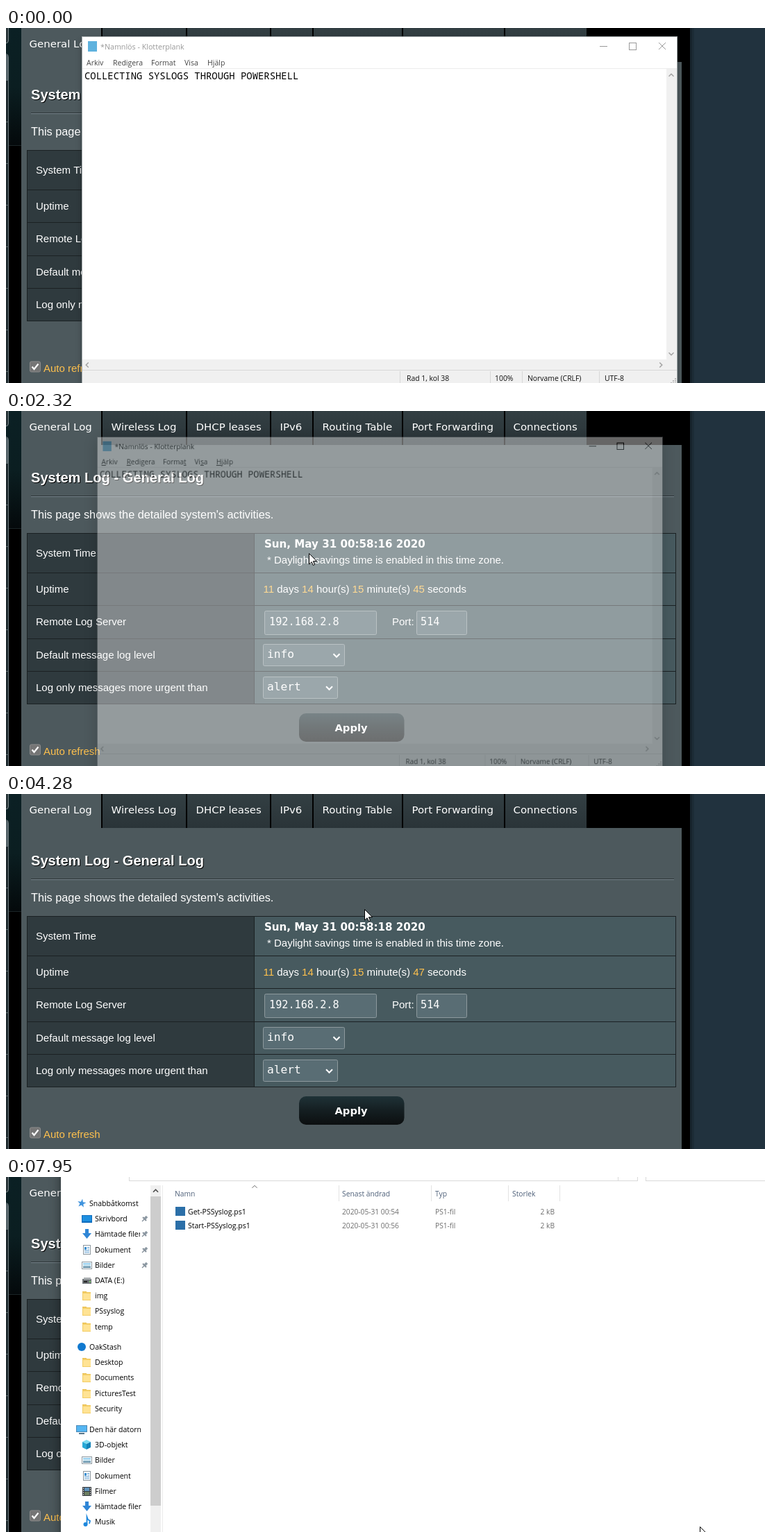
An HTML page with a canvas for the animation above (8000 ms loop, 1093 by 512 pixels).

```html
<!DOCTYPE html>
<html lang="sv">
<head>
<meta charset="utf-8">
<title>Syslog</title>
<style>
html, body { margin: 0; width: 100%; height: 100%; overflow: hidden; background: #000; }
canvas { display: block; }
</style>
</head>
<body>
<canvas id="stage" width="1093" height="512"></canvas>
<script>
const W = 1093, H = 512, LOOP = 8000;
const stage = document.getElementById('stage').getContext('2d');
const layer = Object.assign(document.createElement('canvas'), { width: W, height: H });
let g = stage;

const ui = (px = 10.5) => `${px}px "Open Sans", "Noto Sans", sans-serif`;
const arial = (px = 15, weight = '') => `${weight} ${px}px "Liberation Sans", sans-serif`;
const wide = (px, weight = '') => `${weight} ${px}px "DejaVu Sans", sans-serif`;
const mono = px => `${px}px "DejaVu Sans Mono", monospace`;

function rect(x, y, w, h, color) {
  g.fillStyle = color;
  g.fillRect(x, y, w, h);
}
function round(x, y, w, h, r, fill, edge) {
  g.beginPath();
  g.roundRect(x, y, w, h, r);
  g.fillStyle = fill;
  g.fill();
  if (edge) { g.strokeStyle = edge; g.lineWidth = 1; g.stroke(); }
}
function frame(x, y, w, h, color) {
  g.strokeStyle = color;
  g.lineWidth = 1;
  g.strokeRect(x + .5, y + .5, w - 1, h - 1);
}
function text(s, x, y, font, color = '#fff') {
  g.font = font;
  g.fillStyle = color;
  g.fillText(s, x, y);
  return x + g.measureText(s).width;
}
function line(points, color, width = 1) {
  g.beginPath();
  points.forEach(([x, y]) => g.lineTo(x, y));
  g.strokeStyle = color;
  g.lineWidth = width;
  g.stroke();
}
function shape(points, fill) {
  g.beginPath();
  points.forEach(([x, y]) => g.lineTo(x, y));
  g.closePath();
  g.fillStyle = fill;
  g.fill();
}
function disc(x, y, r, fill) {
  g.beginPath();
  g.arc(x, y, r, 0, 7);
  g.fillStyle = fill;
  g.fill();
}
function fade(y0, y1, ...colors) {
  const f = g.createLinearGradient(0, y0, 0, y1);
  colors.forEach((c, i) => f.addColorStop(i / (colors.length - 1), c));
  return f;
}
// Small open arrowhead pointing along (dx, dy)
function chevron(x, y, dx, dy, size, color, width) {
  const tip = s => [x - dx * size / 2 + dy * s * size, y - dy * size / 2 + dx * s * size];
  line([tip(-1), [x + dx * size / 2, y + dy * size / 2], tip(1)], color, width);
}
function shadow(x, y, w, h, blur, alpha) {
  g.save();
  g.shadowColor = `rgba(0,0,0,${alpha})`;
  g.shadowBlur = blur;
  g.shadowOffsetY = 3;
  rect(x, y, w, h, '#fff');
  g.restore();
}

/* ---------- router page ---------- */
const TABS = [
  ['General Log', 22, 115, 34], ['Wireless Log', 139, 120, 152], ['DHCP leases', 261, 119, 274],
  ['IPv6', 382, 59, 395], ['Routing Table', 443, 127, 456], ['Port Forwarding', 572, 145, 585],
  ['Connections', 719, 117, 731]];
const ROWS = [
  ['System Time', 176, 233], ['Uptime', 233, 280], ['Remote Log Server', 280, 328],
  ['Default message log level', 328, 375], ['Log only messages more urgent than', 375, 422]];
const GOLD = '#ffc14d', FIELD = '#596d74', EDGE = '#8d999d', RULE = '#1b2123';

function sidebar() {
  rect(0, 0, 22, 170, fade(0, 170, '#0b2024', '#0b1e21', '#04090b'));
  rect(4, 169, 18, 1, '#1b2427');
  round(-10, -10, 13.5, 32, 4, '#2a3639', '#79868a');
  round(-10, 37.5, 13.5, 500, 4, '#1f2a2e', '#6d7a7e');
  rect(0, 39, 3, 36, '#566469');
  for (let i = 0; i < 8; i++) rect(0, 75 + i * 60, 4, 1, '#5d6a6e');
}

function page(sec) {
  rect(0, 0, W, H, '#000');
  rect(985, 0, 108, H, '#21323e');
  rect(985, 0, 3, H, '#17242d');
  rect(988, 0, 3, H, '#1c2c36');
  sidebar();
  rect(22, 49, 951, H, '#4d595d');
  TABS.forEach(([label, x, w, tx], i) => {
    round(x, -8, w, 57, [8, 8, 0, 0], i ? fade(0, 49, '#333f43', '#2a3438') : '#4d595d');
    text(label, tx - .5, 28, wide(14.95));
  });

  text('System Log - General Log', 37, 104, arial(20.1, 'bold'), '#000');
  text('System Log - General Log', 36, 103, arial(20.1, 'bold'));
  rect(36, 122, 926, 1, '#2c3437');
  rect(36, 123, 926, 1, '#76838a');
  text("This page shows the detailed system's activities.", 36, 155, arial(16.28));

  for (const [label, top, bottom] of ROWS) {
    rect(30, top, 327, bottom - top, '#2f3a3e');
    rect(357, top, 608, bottom - top, '#475a5f');
    rect(30, top, 935, 1, RULE);
    text(label, 43, Math.round((top + bottom) / 2 + 5.2), arial());
  }
  frame(30, 176, 935, 247, RULE);
  rect(357, 176, 1, 247, RULE);

  text(`Sun, May 31 00:58:${sec} 2020`, 372, 197, wide(15.1, 'bold'));
  text('* Daylight savings time is enabled in this time zone.', 376, 220, arial());
  let x = 370.5;
  [11, ' days ', 14, ' hour(s) ', 15, ' minute(s) ', sec + 29, ' seconds']
    .forEach((s, i) => x = text(s, x, 262, arial(), i % 2 ? '#fff' : GOLD));

  round(372.5, 288.5, 161, 34, 2, FIELD, EDGE);
  text('192.168.2.8', 379, 309, mono(15.2));
  text('Port:', 556, 309, arial());
  round(591.5, 288.5, 72, 34, 2, FIELD, EDGE);
  text('514', 597, 309, mono(15.2));
  round(370.5, 336.5, 117, 31, 2, FIELD, EDGE);
  text('info', 376, 356, mono(16.2));
  chevron(476, 352.5, 0, 1, 4.5, '#fff', 2);
  round(370.5, 383.5, 107, 31, 2, FIELD, EDGE);
  text('alert', 376, 403, mono(16.2));
  chevron(465.5, 399.5, 0, 1, 4.5, '#fff', 2);

  round(422, 436, 151.5, 41, 10, fade(436, 477, '#1f3237', '#141e21', '#0c0f10'));
  text('Apply', 473.5, 462, wide(14.7, 'bold'));
  round(34.5, 481, 15, 15, 2, '#757575', '#8b8b8b');
  line([[37.5, 488.5], [40.5, 492], [46.5, 484.5]], '#fff', 2.2);
  text('Auto refresh', 54, 496, arial(), GOLD);
}

/* ---------- text editor ---------- */
const MENU = [['Arkiv', 116, 0], ['Redigera', 154, 0], ['Format', 209, 5], ['Visa', 257, 2], ['Hjälp', 290, 0]];
const STATUS = [['Rad 1, kol 38', 567, 577], ['100%', 697, 704], ['Norvame (CRLF)', 743, 751], ['UTF-8', 854, 862]];

function editor(active, deep, keys) {
  const ink = active ? '#000' : '#999';
  shadow(109, 13, 857, 520, deep ? 20 : 8, deep ? .45 : .3);
  frame(109, 12, 858, 520, active ? '#6b7275' : '#a5abad');
  round(118, 19, 13, 15, 0, '#5fb2de');
  text('*Namnlös - Klotterplank', 136, 31, ui(10.7), ink);
  rect(855, 26, 11, 1, ink);
  frame(897, 21, 11, 11, ink);
  line([[940, 21], [950, 31]], ink);
  line([[950, 21], [940, 31]], ink);
  for (const [label, x, key] of MENU) {
    text(label, x, 54, ui(), active ? '#111' : '#444');
    if (keys) {
      const left = x + g.measureText(label.slice(0, key)).width;
      rect(left, 55, g.measureText(label[key]).width, 1, '#111');
    }
  }
  rect(110, 58, 856, 1, '#ececec');
  text('COLLECTING SYSLOGS THROUGH POWERSHELL', 113, 74, '13.9px "Noto Sans Mono", monospace', '#000');

  rect(951, 59, 15, 420, '#f0f0f0');
  rect(110, 478, 856, 34, '#f0f0f0');
  rect(110, 493, 856, 1, '#d7d7d7');
  chevron(958, 68, 0, -1, 3.5, '#a3a3a3', 1.5);
  chevron(958, 470, 0, 1, 3.5, '#a3a3a3', 1.5);
  chevron(117, 486, -1, 0, 3.5, '#a3a3a3', 1.5);
  chevron(943, 486, 1, 0, 3.5, '#a3a3a3', 1.5);
  for (const [label, bar, x] of STATUS) {
    rect(bar, 495, 1, 17, '#d7d7d7');
    text(label, x, 509, ui(10.4), '#111');
  }
  for (const [x, y] of [[963, 505], [960, 508], [963, 508], [957, 511], [960, 511], [963, 511]])
    rect(x, y, 2, 2, '#b8b8b8');
}

/* ---------- file browser ---------- */
const ICONS = {
  star(x, y) {
    shape(Array.from({ length: 10 }, (_, i) => {
      const r = i % 2 ? 2.6 : 6.5, a = i * Math.PI / 5 - 1.4;
      return [x + r * Math.cos(a), y + r * Math.sin(a)];
    }), '#3f93dd');
  },
  desk(x, y) {
    rect(x - 7, y - 5, 15, 11, '#0f6cbd');
    rect(x - 6, y - 4, 13, 8, '#1e8fe0');
  },
  down(x, y) {
    shape([[-2, -7], [3, -7], [3, -1], [7, -1], [.5, 7], [-6, -1], [-2, -1]]
      .map(([a, b]) => [x + a, y + b]), '#2f86d6');
  },
  doc(x, y) {
    rect(x - 5, y - 7, 11, 14, '#8a969e');
    rect(x - 4, y - 6, 9, 12, '#fff');
    rect(x - 3, y - 4, 3, 4, '#3c8fd0');
    for (let i = 0; i < 4; i++) rect(x - (i < 2 ? -1 : 3), y - 4 + i * 2.5, i < 2 ? 3 : 7, 1, '#5b9bd0');
  },
  pic(x, y) {
    rect(x - 7, y - 5, 15, 11, '#8f9ba3');
    rect(x - 6, y - 4, 13, 9, '#fff');
    rect(x - 5, y - 3, 11, 7, fade(y - 3, y + 4, '#8ccbf0', '#cfe8f3', '#3d6f8c'));
  },
  disk(x, y) {
    rect(x - 6, y - 2, 13, 7, '#6e7377');
    rect(x - 4, y - 4, 10, 3, '#a9aeb1');
    rect(x - 4, y + 1, 5, 2, '#222');
    rect(x + 4, y + 1, 2, 2, '#7ad06c');
  },
  folder(x, y) {
    rect(x - 6, y - 6, 6, 4, '#e9bd4d');
    rect(x - 6, y - 5, 12, 12, '#f3cd66');
    rect(x - 5, y - 3, 11, 9, '#ffe394');
  },
  dot(x, y) { disc(x, y, 6, '#1079cf'); },
  pc(x, y) {
    rect(x - 8, y - 6, 16, 10, '#4a88b5');
    rect(x - 7, y - 5, 14, 8, '#55b6f2');
    rect(x - 4, y + 5, 8, 2, '#55748a');
  },
  cube(x, y) {
    shape([[x, y - 7], [x + 6, y - 4], [x, y - 1], [x - 6, y - 4]], '#7fdcf0');
    shape([[x - 6, y - 4], [x, y - 1], [x, y + 7], [x - 6, y + 4]], '#27a9d6');
    shape([[x + 6, y - 4], [x, y - 1], [x, y + 7], [x + 6, y + 4]], '#1483b8');
  },
  film(x, y) {
    rect(x - 6, y - 6, 13, 13, '#33383c');
    rect(x - 3, y - 5, 7, 5, '#5f93bd');
    rect(x - 3, y + 1, 7, 5, '#6d7f62');
    for (let i = 0; i < 4; i++) { rect(x - 5, y - 5 + i * 3, 1, 2, '#ddd'); rect(x + 5, y - 5 + i * 3, 1, 2, '#ddd'); }
  },
  note(x, y) {
    disc(x - 1.5, y + 4, 3, '#1e88dd');
    line([[x + .5, y + 4], [x + .5, y - 7], [x + 2, y - 3], [x + 5, y - 1], [x + 4, y + 3]], '#1e88dd', 1.8);
  }
};
// Groups: first row y, heading, then entries; the last word is the icon
const TREE = [
  [38, 'Snabbåtkomst star', 'Skrivbord desk', 'Hämtade filer down', 'Dokument doc', 'Bilder pic',
    'DATA (E:) disk', 'img folder', 'PSsyslog folder', 'temp folder'],
  [245, 'OakStash dot', 'Desktop folder', 'Documents folder', 'PicturesTest folder', 'Security folder'],
  [364, 'Den här datorn pc', '3D-objekt cube', 'Bilder pic', 'Dokument doc', 'Filmer film',
    'Hämtade filer down', 'Musik note']];

function pin(x, y) {
  line([[x - 4, y + 4], [x - 1, y + 1]], '#7f8b95', 1.2);
  line([[x - 3, y - 2], [x + 2, y + 3]], '#7f8b95', 1.8);
  line([[x - 1, y + 1], [x + 3, y - 3]], '#8d99a3', 3.6);
}

function browser() {
  shadow(79, -20, 1040, 560, 16, .45);
  rect(177, 5, 733, 1, '#d9d9d9');
  for (const x of [177, 881, 909, 921]) rect(x, 0, 1, 5, '#d9d9d9');
  rect(921, 5, 172, 1, '#d9d9d9');

  for (const [top, ...items] of TREE) items.forEach((item, i) => {
    const cut = item.lastIndexOf(' '), y = Math.round(top + i * 22.2);
    const pinned = top === 38 && i > 0 && i < 5;
    ICONS[item.slice(cut + 1)](i ? 116 : 109, y);
    g.save();
    g.beginPath();
    g.rect(79, 0, pinned ? 114 : 128, H);
    g.clip();
    text(item.slice(0, cut), i ? 128 : 120, y + 4, ui(), '#000');
    g.restore();
    if (pinned) pin(200, y);
  });

  rect(208, 12, 15, 500, '#f0f0f0');
  rect(208, 28, 15, 446, '#cdcdcd');
  chevron(215.5, 20, 0, -1, 3.5, '#505050', 1.7);
  rect(225, 12, 1, 500, '#ebebeb');

  [['Namn', 243], ['Senast ändrad', 484], ['Typ', 618], ['Storlek', 729]]
    .forEach(([s, x]) => text(s, x, 28, ui(10.3), '#4d5f78'));
  for (const x of [479, 612, 723, 797]) rect(x, 12, 1, 23, '#e3e3e3');
  chevron(358, 14, 0, -1, 3.5, '#666', 1);
  [['Get-PSSyslog.ps1', '54', 50], ['Start-PSSyslog.ps1', '56', 70]].forEach(([name, min, y]) => {
    rect(244, y - 7, 14, 13, '#2b6fa8');
    text(name, 262, y + 4, ui(), '#000');
    text('2020-05-31 00:' + min, 484, y + 4, ui(10.2), '#6d6d6d');
    text('PS1-fil', 618, y + 4, ui(10.2), '#6d6d6d');
    g.textAlign = 'right';
    text('2 kB', 790, y + 4, ui(10.2), '#6d6d6d');
    g.textAlign = 'left';
  });
}

/* ---------- pointer ---------- */
// start, end, number of steps, path (empty: hidden)
const MOVES = [
  [0, 0, 1, []],
  [520, 1070, 8, [[855, 479], [730, 392], [570, 290], [444, 232], [449, 229]]],
  [1220, 1370, 3, [[446, 229], [437, 229]]],
  [2320, 2400, 2, [[436, 205], [435, 180]]],
  [2560, 3340, 11, [[440, 190], [470, 255], [505, 301], [530, 298], [541, 289]]],
  [3410, 3560, 3, [[536, 268], [520, 204]]],
  [3880, 4040, 3, [[519, 192], [516, 166]]],
  [4440, 4510, 2, [[513, 166], [509, 166]]],
  [4980, 5310, 5, [[540, 190], [760, 330], [950, 465], [1004, 505]]],
  [5620, 5620, 1, []],
  [7070, 7860, 11, [[940, 465], [790, 388], [680, 334], [666, 329], [760, 376], [910, 452], [984, 485]]],
  [7950, 7950, 1, [[999, 504]]]];

function pointerAt(t) {
  const [start, end, steps, path] = MOVES.findLast(m => m[0] <= t);
  if (!path.length) return null;
  const gaps = steps - 1 || 1, gap = (end - start) / gaps || 1;
  const k = Math.min(steps - 1, Math.floor((t - start) / gap + 1e-6));
  const u = k / gaps * (path.length - 1);
  const i = Math.floor(u), a = path[i], b = path[i + 1] || a;
  return a.map((v, n) => Math.round(v + (b[n] - v) * (u - i)));
}

function pointer(t) {
  const p = pointerAt(t);
  if (!p) return;
  const [x, y] = p;
  if (t >= 4190 && t < 4280) disc(x, y, 11, 'rgba(255,255,0,.47)');
  if (t < 2320 && y < 478) {
    rect(x, y - 6, 1, 13, '#000');
    for (const dy of [-7, 7]) {
      rect(x - 3, y + dy, 3, 1, '#000');
      rect(x + 1, y + dy, 3, 1, '#000');
    }
    return;
  }
  const arrow = [[0, 0], [0, 15.5], [3.6, 12.2], [5.8, 17], [8, 16], [5.9, 11.2], [11, 11.2]]
    .map(([a, b]) => [x + a + .5, y + b + .5]);
  shape(arrow, '#fff');
  line([...arrow, arrow[0]], '#000', 1);
}

/* ---------- timeline ---------- */
function clock(t) {
  return t < 2720 ? 16 : t < 3710 ? 17 : t < 4750 ? 18 : t < 5230 ? 20 : 21;
}

function draw(t) {
  page(clock(t));
  if (t < 2320) editor(t >= 1690, t >= 1770, t >= 2240);
  else if (t < 2400) {
    g = layer.getContext('2d');
    g.clearRect(0, 0, W, H);
    editor(true, true, true);
    g = stage;
    g.globalAlpha = .4;
    g.drawImage(layer, W * .025, H * .05, W * .95, H * .95);
    g.globalAlpha = 1;
  }
  if (t >= 6000) browser();
  pointer(t);
}

const begin = performance.now();
function tick() {
  draw((performance.now() - begin) % LOOP);
  requestAnimationFrame(tick);
}
tick();
</script>
</body>
</html>
```
